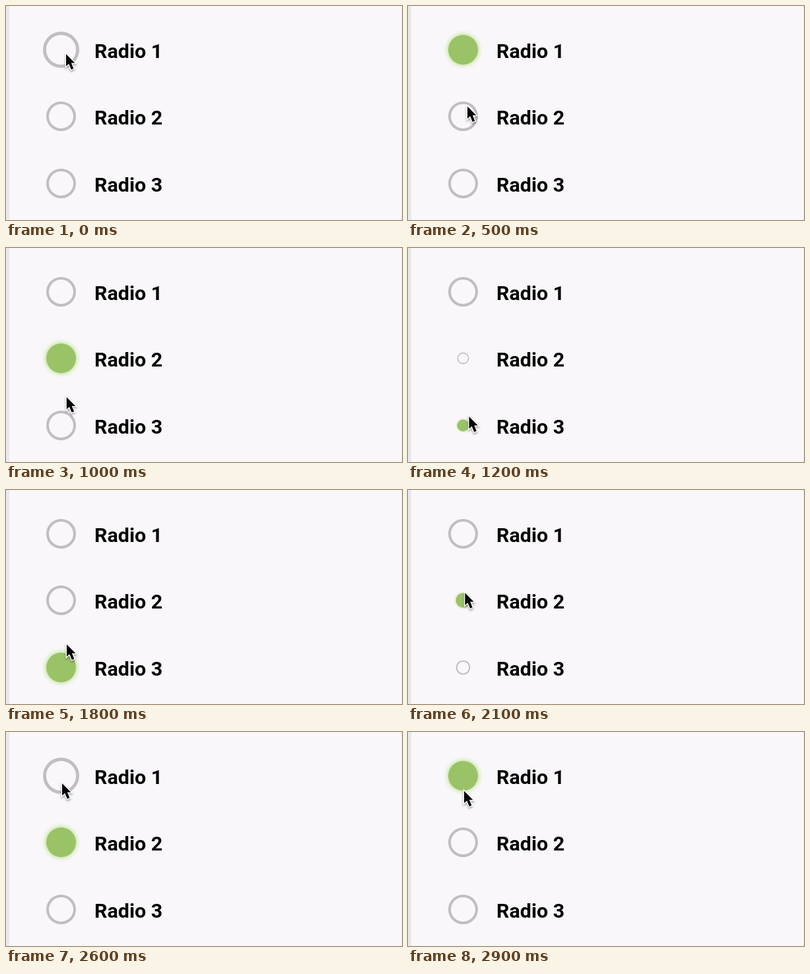
Animation, 600 px wide and 325 px high, one loop 3.1 s. Source, as an HTML page:

```html
<!DOCTYPE html>
<html lang="en">
<head>
<meta charset="utf-8">
<title>Radio buttons</title>
<style>
  html, body { margin: 0; width: 100%; height: 100%; overflow: hidden; }
  body { position: relative; background: #f9f7fa; }
  .edge { position: absolute; top: 0; bottom: 0; background: #e9e8ea; }
  .left { left: 0; width: 5px; }
  .right { left: 599px; width: 1px; }
  .row { position: absolute; left: 0; top: calc(44px + 101.4px * var(--i)); }
  .dot {
    position: absolute; left: 61.2px; top: -.2px; width: 45px; height: 45px;
    box-sizing: border-box; border: 4.4px solid #c0bec1; border-radius: 50%;
  }
  .dot.on { border: 0; background: #9ac267; box-shadow: 0 0 7px 1px #b4e283; }
  .label {
    position: absolute; left: 134.1px; top: 7px; white-space: pre; color: #050505;
    font: 700 30.4px/36px Roboto, sans-serif;
  }
  #cursor {
    position: absolute; left: 0; top: 0; overflow: visible;
    filter: drop-shadow(0 2px 1.5px rgba(0, 0, 0, .35));
  }
</style>
</head>
<body>
<div class="edge left"></div>
<div class="edge right"></div>
<div class="row" style="--i:0"><div class="dot"></div><div class="label">Radio 1</div></div>
<div class="row" style="--i:1"><div class="dot"></div><div class="label">Radio 2</div></div>
<div class="row" style="--i:2"><div class="dot"></div><div class="label">Radio 3</div></div>
<svg id="cursor" width="18" height="28">
  <path d="M0 0V18.6L4.2 14.8L7.8 23.4L11.4 21.9L7.9 13.5H13.4Z"
    fill="#050505" stroke="#fff" stroke-width="2.8" paint-order="stroke"/>
</svg>
<script>
  const LOOP = 3100, TICK = 100, GROW = 250, HOLD = 70, PRESSED = 1.22;

  const clicks = [
    { at: 30, i: 0 }, { at: 618, i: 1 }, { at: 1144, i: 2 },
    { at: 2030, i: 1 }, { at: 2640, i: 0 }
  ];

  const stops = [
    { at: 0, x: 91, y: 73 },
    { at: 500, x: 90, y: 152.5 },
    { at: 1200, x: 92.5, y: 256 },
    { at: 1700, x: 92, y: 249 },
    { at: 1800, x: 92, y: 234.5 },
    { at: 2000, x: 87, y: 169 },
    { at: 2300, x: 85, y: 131 },
    { at: 2600, x: 85, y: 78 },
    { at: 2900, x: 85, y: 89.5 }
  ];

  const dots = document.querySelectorAll('.dot');
  const cursor = document.getElementById('cursor');
  const easeOut = p => 1 - (1 - Math.min(p, 1)) ** 2;
  const mix = (a, b, p) => a + (b - a) * p;

  // The pointer settles early on its slow way off the last button
  function pointerAt(t) {
    const n = stops.findIndex(s => s.at > t);
    if (n < 0) return stops[stops.length - 1];
    const a = stops[n - 1], b = stops[n];
    const p = Math.min(1, (t - a.at) / Math.min(b.at - a.at, b.y < a.y && a.y > 250 ? 200 : LOOP));
    return { x: mix(a.x, b.x, p), y: mix(a.y, b.y, p) };
  }

  function draw(t) {
    const scale = [1, 1, 1];
    let picked = -1;
    for (const { at, i } of clicks) {
      if (t < at) {
        if (t > at - HOLD) scale[i] = PRESSED;
        break;
      }
      const s = easeOut((t - at) / GROW);
      if (picked >= 0) scale[picked] = s;
      scale[i] = s;
      picked = i;
    }
    dots.forEach((dot, i) => {
      dot.classList.toggle('on', i === picked);
      dot.style.transform = `scale(${scale[i]})`;
    });
    const { x, y } = pointerAt(t);
    cursor.style.transform = `translate(${x}px, ${y}px)`;
  }

  const start = performance.now();
  function frame() {
    const t = (performance.now() - start) % LOOP;
    draw(Math.floor(t / TICK) * TICK);
    requestAnimationFrame(frame);
  }
  frame();
</script>
</body>
</html>
```
